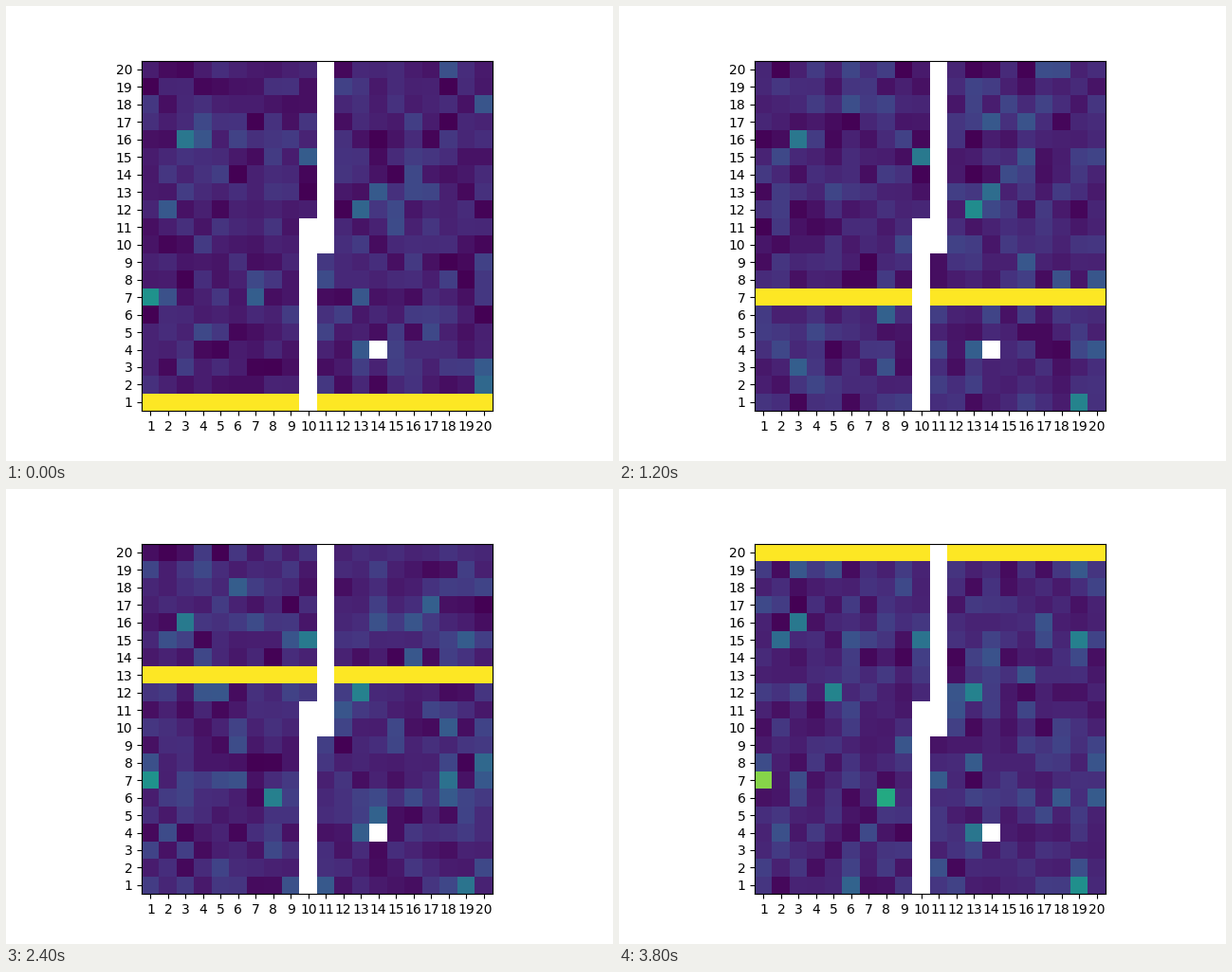
Write a matplotlib script that moves like this. It is 640x480 px and loops after 4000 ms.

```python
import numpy as np
import matplotlib.pyplot as plt
from matplotlib.animation import FuncAnimation

N = 20
STEP_MS = 200
rng = np.random.default_rng(12)


def drift(shape, hold=0.85, slow_part=0.75):
    """Unit noise per step: a slowly drifting part plus a fresh one."""
    slow = rng.standard_normal(shape)
    steps = []
    for _ in range(N):
        fresh = rng.standard_normal(shape)
        steps.append(slow_part * slow + np.sqrt(1 - slow_part**2) * fresh)
        slow = hold * slow + np.sqrt(1 - hold**2) * rng.standard_normal(shape)
    return np.array(steps)


# Cells that stay bright: (column, row) -> level at the start and end
BRIGHT = {
    (1, 7): (0.60, 0.75),
    (8, 6): (0.10, 0.65),
    (19, 1): (0.44, 0.46),
    (13, 4): (0.32, 0.40),
    (3, 16): (0.40, 0.40),
    (13, 12): (0.35, 0.48),
    (10, 15): (0.32, 0.42),
    (19, 15): (0.05, 0.45),
    (2, 15): (0.10, 0.38),
    (5, 12): (0.02, 0.40),
}

# Dim background: skewed noise that brightens slightly over the loop
g = drift((N, N))
base = np.linspace(0.10, 0.12, N)[:, None, None]
data = np.clip(base + 0.062 * g + 0.008 * (g**2 - 1), 0, 1)

for (col, row), (start, end) in BRIGHT.items():
    level = np.linspace(start, end, N)
    flicker = 1 + 0.1 * rng.standard_normal(N)
    data[:, row - 1, col - 1] = np.clip(level * flicker, 0, 1)

# The scanning row climbs one row per step
data[range(N), range(N), :] = 1

# Empty cells
data[:, :11, 9] = np.nan
data[:, 9:, 10] = np.nan
data[:, 3, 13] = np.nan

fig, ax = plt.subplots(figsize=(6.4, 4.8), dpi=100)
image = ax.imshow(data[0], cmap="viridis", vmin=0, vmax=1,
                  origin="lower", interpolation="nearest")
ax.set_xticks(range(N), range(1, N + 1))
ax.set_yticks(range(N), range(1, N + 1))


def update(i):
    image.set_data(data[i])
    return [image]


anim = FuncAnimation(fig, update, frames=N, interval=STEP_MS,
                     repeat=True, repeat_delay=0)
plt.show()
```
